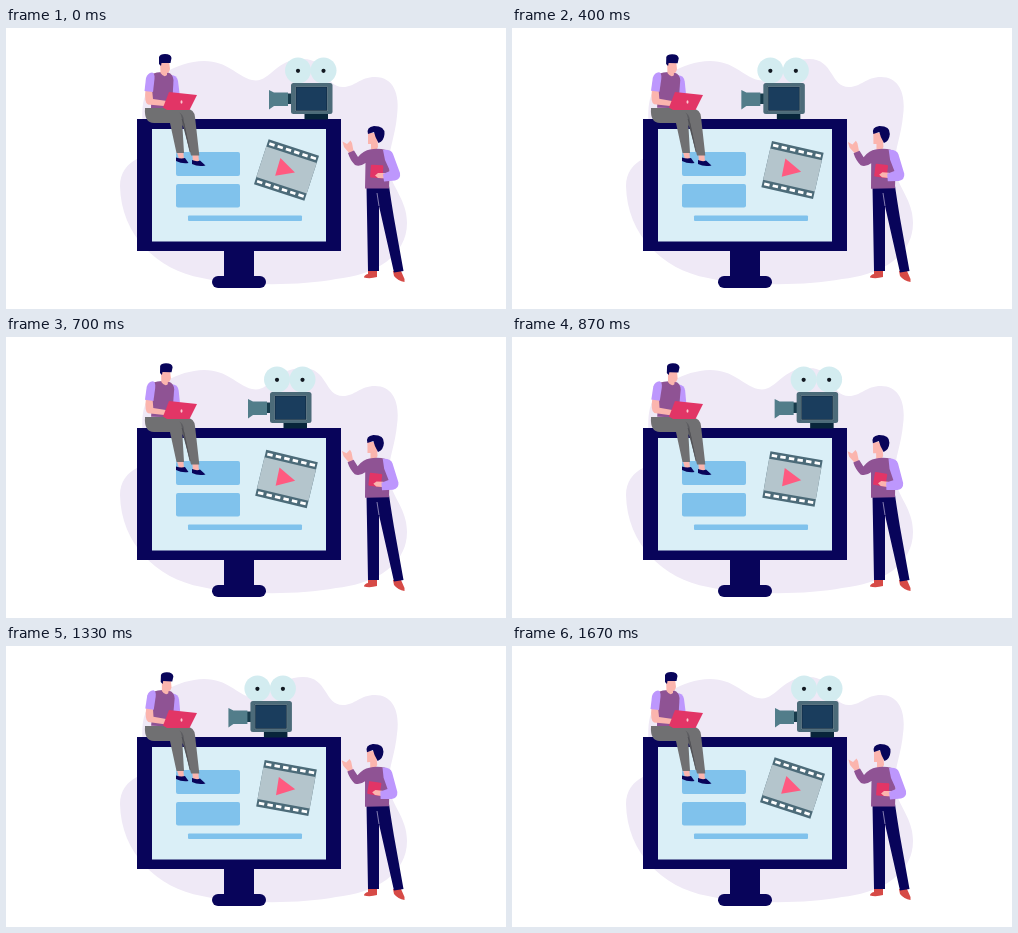
These frames come from a looping animation (500 by 281 pixels, 1710 ms). An HTML page:

```html
<!DOCTYPE html>
<html>
<head>
<meta charset="utf-8">
<style>
html, body { margin: 0; width: 100%; height: 100%; overflow: hidden; background: #fff; }
svg { display: block; width: 100vw; height: 100vh; }
.navy { fill: #08045a; }
.skin { fill: #fbb5ae; }
.plum { fill: #8f5394; }
.lilac { fill: #bd97fd; }
.red { fill: #e23566; }
.sky { fill: #80c2ec; }
.steel { fill: #4c6b79; }
.grey { fill: #707072; }
</style>
</head>
<body>
<svg viewBox="0 0 500 281">
  <path fill="#efe9f6" d="M114 158C114 145 121 136 131 131C142 120 134 96 137 76C141 50 170 34 198 33C222 33 230 48 246 52C264 56 268 31 297 31C322 31 318 59 337 59C349 59 354 49 369 49C388 49 394 67 391 88C389 110 381 125 383 142C386 160 401 172 401 195C401 228 369 247 330 251C295 258 232 258 196 250C151 242 115 207 114 158Z"/>

  <!-- monitor -->
  <g class="navy">
    <rect x="131" y="91" width="204" height="132"/>
    <rect x="218" y="222" width="30" height="30"/>
    <rect x="206" y="248" width="54" height="12" rx="6"/>
  </g>
  <rect x="146" y="101" width="174" height="112.500" fill="#daeff7"/>
  <g class="sky">
    <rect x="170" y="124" width="64" height="24" rx="2"/>
    <rect x="170" y="156" width="64" height="23.500" rx="2"/>
    <rect x="182" y="187.500" width="114" height="5.500" rx="1"/>
  </g>

  <g id="film">
    <rect class="steel" x="-26.500" y="-23.700" width="53" height="47.400"/>
    <rect x="-26.500" y="-16" width="53" height="32" fill="#b4c5cc"/>
    <path d="M-24.500 -19.800H26M-24.500 19.800H26" stroke="#fff" stroke-width="2.800" stroke-dasharray="5.500 3.200"/>
    <path d="M-9.500 -9.500L8.800 -.3L-9 9Z" fill="#ff5a80"/>
  </g>

  <g id="camera">
    <g fill="#d3ecf0">
      <circle cx="292" cy="42.500" r="13"/>
      <circle cx="317.500" cy="42.500" r="13"/>
    </g>
    <circle cx="292" cy="42.800" r="2.100" fill="#111820"/>
    <circle cx="317.500" cy="42.800" r="2.100" fill="#111820"/>
    <rect x="298.500" y="84" width="23.500" height="7.500" fill="#08253a"/>
    <rect x="281" y="65.500" width="6" height="10.500" fill="#173b4b"/>
    <path d="M263 62L268 64.500H282V78H268L263 81.500Z" fill="#527d8a"/>
    <rect class="steel" x="285" y="55" width="41.500" height="31" rx="2.500"/>
    <rect x="289.700" y="58.700" width="31.500" height="24" fill="#1a3d5d" stroke="#0b2438" stroke-width="1.200"/>
    <path d="M289.500 58.500H321.500V83H289.500Z" fill="none" stroke="#a4bac2" stroke-width=".5"/>
  </g>

  <!-- seated man -->
  <g>
    <path class="skin" d="M170 121H177L178 131H173ZM186 122H192L193 134H187Z"/>
    <path class="navy" d="M170 129.500Q175 131 179 130L182.500 135Q176 136 170 133ZM186 132Q191 134 194 132.500L199.500 137.500Q192 139 186 136Z"/>
    <path class="grey" d="M150 81H181Q188 81 189 89L193.300 127.500H185L177 95H150Z"/>
    <path fill="#5c5c60" d="M158 84H171Q178 85 178 94L184 124L177 98Z"/>
    <path class="grey" d="M139 80H166Q175 82 176 91L178 125H170.500L164 95H148Q138 95 139 80Z"/>
    <path d="M176 91L178 96L184 124" fill="none" stroke="#4d4d52" stroke-width=".8"/>
  </g>
  <g id="sitter">
    <path class="lilac" d="M165 47Q171 47 172 53L173.500 65H163Z"/>
    <path class="plum" d="M146 46Q153 43 162 44.500Q167 46 167.500 52L166 80H145Z"/>
    <path class="skin" d="M154 33H163L164 41Q163 45 161 45V47Q158 50 154.500 45Z"/>
    <path class="navy" d="M153 36V29Q154 26 159 26Q165 26 165.500 30L164.500 35H155.500L155 38Z"/>
    <path class="skin" d="M139.500 61H146L147 71L161 73L163 76L158 78L142 76.500Q138 75 139.500 61Z"/>
    <path class="lilac" d="M146 44.500Q149 45 148.500 51L147 64L138.500 63L140 50Q141.500 45 146 44.500Z"/>
  </g>
  <path class="red" d="M163 64L191 67L183.500 82H161L157 79.500Z"/>
  <ellipse cx="175.500" cy="74" rx="1" ry="1.700" fill="#fbc8d0"/>

  <!-- standing man -->
  <path fill="#d64a46" d="M362 243H371L371 249Q364 251 358 249.500Q358 247 362 246ZM387 243H395L398.500 251V254Q392 253 388 248Z"/>
  <path class="navy" d="M360.500 158H383Q385 172 388 190L397.500 243L388 244.500L373 178L373 243H362Z"/>
  <path d="M373 178L371 165" stroke="#d8d0ec" stroke-width=".6"/>
  <g id="stander">
    <path class="skin" d="M344 126L338 119L336.500 113.500L341 116L344.500 112.500L346 115L347.500 123Z"/>
    <path class="skin" d="M362 105H371L372 119L369 124L365 122V116H362Z"/>
    <path class="navy" d="M362 106Q360 99 368 98Q379 98 378.500 106Q378 113 372.500 115L369.500 109L368 104Z"/>
    <path class="plum" d="M364 121.500Q372 120 380 122Q385 124 384 133L383 160.500H359L359.500 135Q354 139 349 137Q344 132 342 125L348 122.500L352 129Q358 122 364 121.500Z"/>
    <g id="arm">
      <rect class="red" x="364.500" y="137" width="12.500" height="13" rx="1" transform="rotate(4 371 143)"/>
      <path class="skin" d="M379 145L372 145L369 147.500L372 150L380 150.500Z"/>
      <path class="lilac" d="M377 122Q385 121 387 126L394 145Q395 151 389 152.500L378 153.500L377 146L384 143L379 132Z"/>
    </g>
  </g>
</svg>
<script>
const LOOP = 1710, STEP = 100 / 3, STEPS = 50;
const part = id => document.getElementById(id);
const [film, camera, sitter, stander, arm] = ['film', 'camera', 'sitter', 'stander', 'arm'].map(part);
const ease = p => (1 - Math.cos(Math.PI * p)) / 2;
const move = (el, value) => el.setAttribute('transform', value);

function draw(now) {
  const step = Math.min(STEPS, Math.floor((now % LOOP + 4) / STEP));

  // Three sways per loop
  const sway = ease(step * 6 / STEPS);
  move(film, `translate(280.5 142) rotate(${18 - 8.5 * sway})`);
  move(sitter, `rotate(${2.2 * sway} 153 85)`);
  move(stander, `rotate(${-1.2 * sway} 371 160)`);
  move(arm, `rotate(${7 * sway} 380 124)`);

  // Two camera passes per loop: slow to the left, quick return
  const pass = step % 25;
  const shift = pass < 17 ? ease(pass / 17) : ease((25 - pass) / 8);
  move(camera, `translate(${-42 * shift} 0)`);

  requestAnimationFrame(() => draw(performance.now() - start));
}
const start = performance.now();
draw(0);
</script>
</body>
</html>
```
